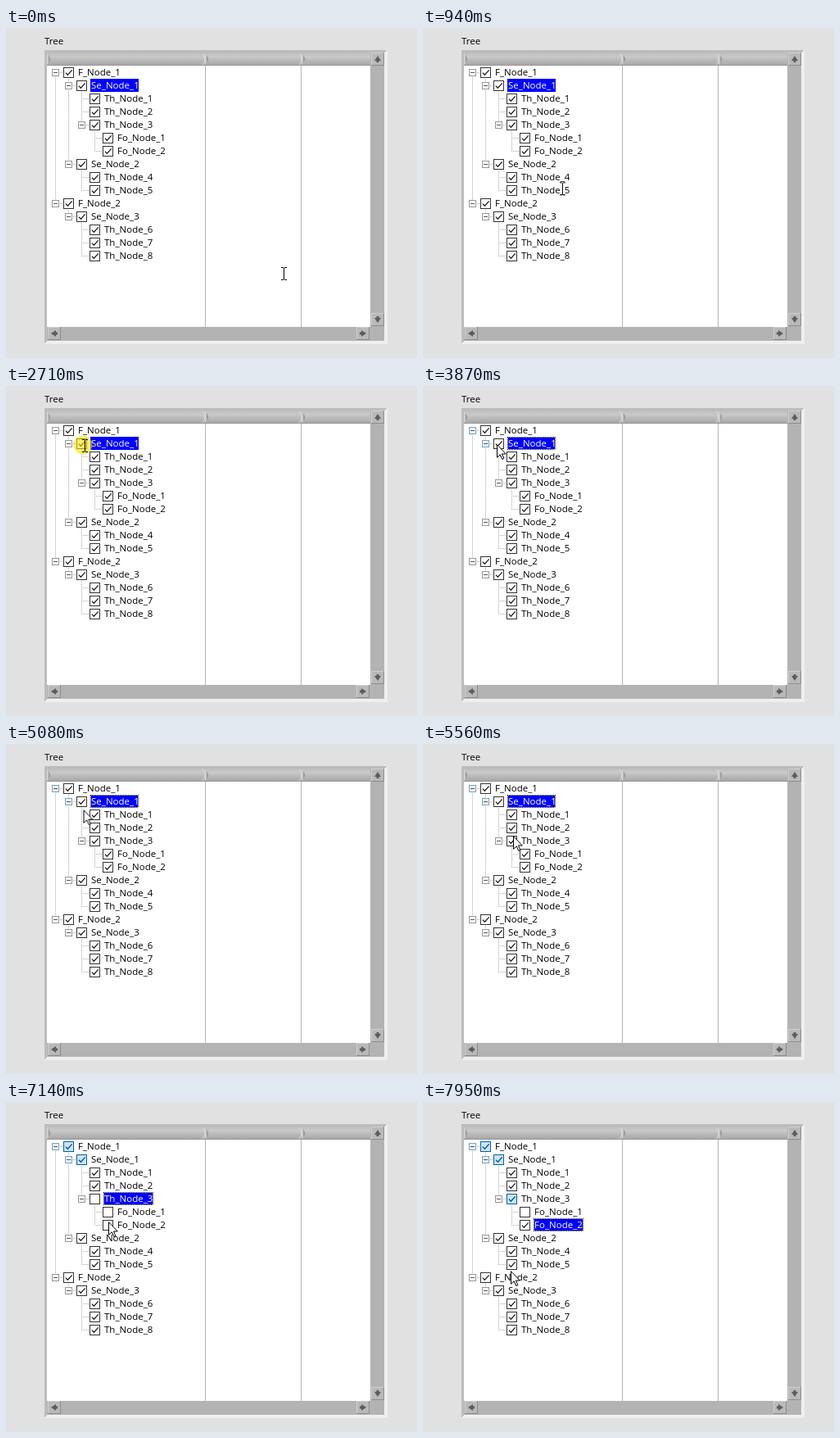
Write an HTML page that moves like this. It is 502 px wide and 403 px high and loops after 8 s.

```html
<!DOCTYPE html>
<html lang="en">
<head>
<meta charset="utf-8">
<title>Tree</title>
<style>
html, body { margin: 0; width: 100%; height: 100%; overflow: hidden; background: #e1e1e1; }
svg { display: block; width: 502px; height: 403px; }
text { font: 11.5px "Open Sans", "Noto Sans", sans-serif; fill: #000; }
.crisp { shape-rendering: crispEdges; }
.dots { stroke: #a8a8a8; stroke-dasharray: 1 1; fill: none; }
.toggle rect { fill: #fff; stroke: #969696; }
.toggle path { stroke: #555; }
.cool rect { fill: #eaf3fb; stroke: #7d9fbd; }
.box rect { fill: #fff; stroke: #333; }
.box path { fill: none; stroke: #222; stroke-width: 1.3; }
.box.part rect { fill: #cce4f7; stroke: #0060a8; }
.box.part path { stroke: #00508c; }
.sel rect { fill: #00f; }
.sel text { fill: #fff; }
.sel .focus { fill: none; stroke: #ff0; stroke-dasharray: 1 1; }

/* Everything runs on one 8 s clock with hard changes. */
.run { animation: 8s step-end infinite; }
.hide { visibility: hidden; }
#cleared { animation-name: cleared; }
#branch { animation-name: branch; }
#leaf { animation-name: leaf; }
#selA { animation-name: selA; }
#selB { animation-name: branch; }
#selC { animation-name: leaf; }
#focusA, #cool { animation-name: touched; }
#beam { animation-name: beam; }
#arrow { animation-name: arrow; }
#halo { animation-name: halo; }

@keyframes cleared { 0%, 48.375% { visibility: hidden } 38.125% { visibility: visible } }
@keyframes branch { 0%, 93.5% { visibility: hidden } 75% { visibility: visible } }
@keyframes leaf { 0% { visibility: hidden } 93.5%, 100% { visibility: visible } }
@keyframes selA { 0% { visibility: visible } 75%, 100% { visibility: hidden } }
@keyframes touched { 0% { visibility: hidden } 38.125%, 100% { visibility: visible } }

@keyframes beam {
  0% { transform: translate(336px, 292px); visibility: visible }
  .875% { transform: translate(309px, 272px) }
  3.5% { transform: translate(309px, 272px); animation-timing-function: steps(6, start) }
  8.3% { transform: translate(186px, 221px) }
  10% { transform: translate(186px, 221px); animation-timing-function: steps(9, start) }
  18.1875% { transform: translate(100px, 74px); animation-timing-function: steps(3, start) }
  20.25% { transform: translate(97px, 78px) }
  23% { transform: translate(97px, 79px); animation-timing-function: steps(7, start) }
  28.8375% { transform: translate(93px, 65px) }
  34.75%, 100% { transform: translate(93px, 65px); visibility: hidden }
}
@keyframes arrow {
  0% { transform: translate(90px, 71px); visibility: hidden }
  34.75% { transform: translate(90px, 71px); visibility: visible }
  62.625% { transform: translate(90px, 71px); animation-timing-function: steps(9, start) }
  70.3625% { transform: translate(110px, 112px) }
  71.125% { transform: translate(109px, 115px) }
  82.375% { transform: translate(109px, 115px); animation-timing-function: steps(8, start) }
  90.125% { transform: translate(125px, 146px) }
  91% { transform: translate(124px, 147px) }
  97.625% { transform: translate(121px, 162px) }
  98.5% { transform: translate(114px, 186px) }
  99.375%, 100% { transform: translate(107px, 206px); visibility: visible }
}
@keyframes halo {
  0%, 36.375%, 48.375%, 74.5%, 93.5%, 100% { visibility: hidden }
  33.875% { transform: translate(94px, 72px); visibility: visible }
  47.625% { transform: translate(92px, 72px); visibility: visible }
  72.75% { transform: translate(110px, 116px); visibility: visible }
  92.625% { transform: translate(125px, 147px); visibility: visible }
}
</style>
</head>
<body>
<svg viewBox="0 0 502 403">
  <defs>
    <linearGradient id="bar" x2="0" y2="1">
      <stop stop-color="#bdbdbd"/><stop offset=".3" stop-color="#c9c9c9"/><stop offset="1" stop-color="#a4a4a4"/>
    </linearGradient>
    <linearGradient id="grip">
      <stop stop-color="#e6e6e6"/><stop offset=".45" stop-color="#b4b4b4"/><stop offset="1" stop-color="#858585"/>
    </linearGradient>
  </defs>
  <text x="47" y="20">Tree</text>
  <g class="crisp">
    <path d="M47 27H466L462 30H50V382L47 386Z" fill="#bcbcbc"/>
    <path d="M466 27V386H47L50 382H462V30Z" fill="#efefef"/>
    <rect x="50" y="30" width="412" height="352" fill="#b3b3b3"/>
    <rect x="50" y="46" width="395" height="319" fill="#fff"/>
    <rect x="50" y="30" width="395" height="16" fill="url(#bar)"/>
    <path d="M50 45.5H445" stroke="#999"/>
    <path d="M243.5 46V365M360.5 46V365" stroke="#b4b4b4"/>
  </g>
  <g id="grips"></g>
  <g id="buttons"></g>
  <g id="tree"></g>
  <g id="cool" class="run hide toggle cool crisp"></g>
  <g id="cleared" class="run hide"></g>
  <g id="branch" class="run hide"></g>
  <g id="leaf" class="run hide"></g>
  <g id="selA" class="run sel"></g>
  <g id="selB" class="run hide sel"></g>
  <g id="selC" class="run hide sel"></g>
  <circle id="halo" class="run hide" r="11.5" fill="#f5e400" fill-opacity=".58"/>
  <path id="beam" class="run crisp" fill="none" stroke="#000" d="M0 .5H3M4 .5H7M3.5 1V15M0 15.5H3M4 15.5H7"/>
  <path id="arrow" class="run hide" fill="#fff" stroke="#000" d="M.5 .7V16.3L4.2 12.8 6.8 18.5 8.9 17.6 6.4 12H11.3Z"/>
</svg>
<script>
const rows = [
  [0, 'F_Node_1', 1], [1, 'Se_Node_1', 1], [2, 'Th_Node_1'], [2, 'Th_Node_2'],
  [2, 'Th_Node_3', 1], [3, 'Fo_Node_1'], [3, 'Fo_Node_2'], [1, 'Se_Node_2', 1],
  [2, 'Th_Node_4'], [2, 'Th_Node_5'], [0, 'F_Node_2', 1], [1, 'Se_Node_3', 1],
  [2, 'Th_Node_6'], [2, 'Th_Node_7'], [2, 'Th_Node_8']
];
const put = (id, html) => { document.getElementById(id).innerHTML = html; };
const rowX = i => 60 + 16 * rows[i][0];
const rowY = i => 54 + 16 * i;

const label = i => `<text x="${rowX(i) + 28}" y="${rowY(i) + 4}">${rows[i][1]}</text>`;

const toggle = i => `<g transform="translate(${rowX(i)} ${rowY(i)})">
  <rect x="-3.5" y="-3.5" width="8" height="8"/><path d="M-2 .5H3"/></g>`;

// kind: 'on', 'part' or 'off'
const box = (i, kind) => `<g class="box ${kind}" transform="translate(${rowX(i) + 16} ${rowY(i)})">
  <rect class="crisp" x="-5.5" y="-5.5" width="12" height="12"/>
  ${kind === 'off' ? '' : '<path d="M-3.2 .6L-.6 3.2 4.7 -2.6"/>'}</g>`;

const boxes = (kind, ...list) => list.map(i => box(i, kind)).join('');

function selection(i, width, focus) {
  const x = rowX(i) + 27, y = rowY(i) - 8;
  return `<rect class="crisp" x="${x}" y="${y}" width="${width}" height="16"/>${label(i)}
    <rect ${focus} x="${x + .5}" y="${y + .5}" width="${width - 1}" height="15"/>`;
}

function branches() {
  let d = 'M60.5 54V214';
  rows.forEach(([level, , open], i) => {
    const x = rowX(i), y = rowY(i) + .5;
    d += `M${x + (level || open ? 0 : 5)} ${y}H${x + 10}`;
    if (!open) return;
    let last = i;
    for (let k = i + 1; k < rows.length && rows[k][0] > level; k++)
      if (rows[k][0] === level + 1) last = k;
    d += `M${x + 16.5} ${rowY(i) + 8}V${rowY(last)}`;
  });
  return `<path class="dots crisp" d="${d}"/>`;
}

function button(x, y, angle) {
  return `<g transform="translate(${x} ${y})">
    <g class="crisp"><rect x="-8" y="-8" width="16" height="16" fill="#b9b9b9"/>
    <path d="M-7.5 8V-7.5H8" fill="none" stroke="#d0d0d0"/>
    <path d="M-8 7.5H7.5V-8" fill="none" stroke="#8d8d8d"/></g>
    <path transform="rotate(${angle})" d="M0 -4L4 2H1.5V4H-1.5V2H-4Z" fill="#5c5c5c"/></g>`;
}

put('grips', [50, 243, 361].map(x =>
  `<path d="M${x} 31Q${x + 8} 38 ${x} 45Z" fill="url(#grip)"/>
   <path d="M${x - 3} 31Q${x + 3} 38 ${x - 3} 45" fill="none" stroke="#dcdcdc" opacity="${x > 50 ? 1 : 0}"/>`).join(''));
put('buttons', button(454, 38, 0) + button(454, 356, 180) + button(59, 373, -90) + button(436, 373, 90));
put('tree', branches() + rows.map((row, i) =>
  (row[2] ? `<g class="toggle crisp">${toggle(i)}</g>` : '') + box(i, 'on') + label(i)).join(''));
put('cool', toggle(0) + toggle(1));
put('cleared', boxes('part', 0) + boxes('off', 1, 2, 3, 4, 5, 6));
put('branch', boxes('part', 0, 1) + boxes('off', 4, 5, 6));
put('leaf', boxes('part', 0, 1, 4) + boxes('off', 5));
put('selA', selection(1, 59, 'id="focusA" class="run hide focus crisp"'));
put('selB', selection(4, 61, 'class="focus crisp"'));
put('selC', selection(6, 61, 'class="focus crisp"'));
// The late focus frame must also vanish together with its selection.
document.getElementById('focusA').style.animationName = 'focusSpan';
document.styleSheets[0].insertRule('@keyframes focusSpan { 0%, 75%, 100% { visibility: hidden } 38.125% { visibility: visible } }');
</script>
</body>
</html>
```
